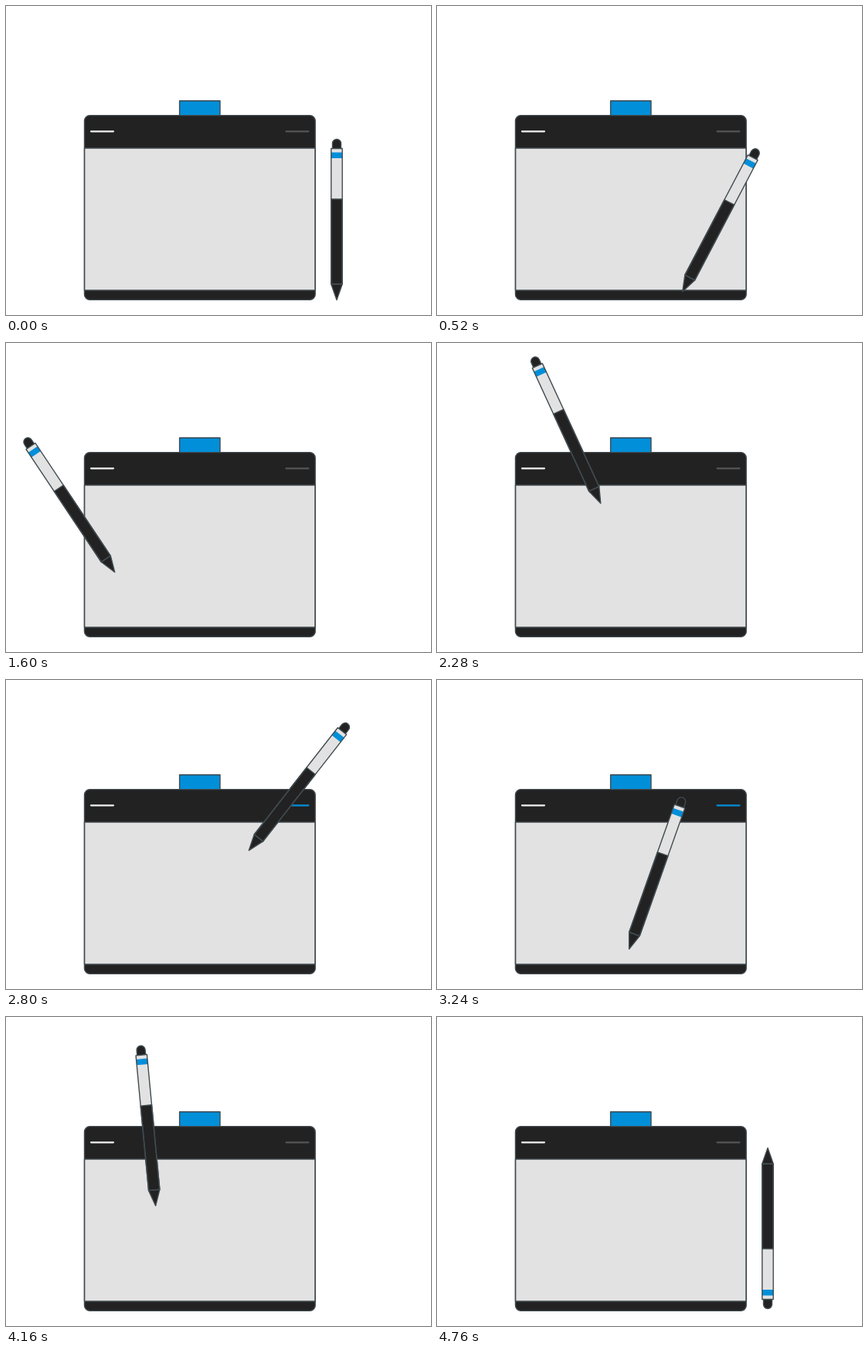
Write an HTML page that moves like this. It is 550 px wide and 400 px high and loops after 4800 ms.

```html
<!DOCTYPE html>
<html lang="en">
<head>
<meta charset="utf-8">
<title>Pen and tablet</title>
<style>
  html, body { margin: 0; width: 100%; height: 100%; overflow: hidden; background: #fff; }
  svg { display: block; width: 100%; height: 100%; }
  .edge { stroke: #414b50; stroke-width: 1.4; stroke-linejoin: round; }
  .dark { fill: #222; }
  .pale { fill: #e2e2e2; }
  .blue { fill: #028fd9; }
  .light { stroke-width: 2.2; stroke-linecap: round; }
</style>
</head>
<body>
<svg viewBox="0 0 550 400">
  <rect class="blue edge" x="224.6" y="122.7" width="52.4" height="22"/>
  <rect class="dark" x="101.5" y="141.6" width="298.7" height="238.8" rx="7"/>
  <rect class="pale edge" x="101.5" y="184" width="298.7" height="184"/>
  <rect class="edge" x="101.5" y="141.6" width="298.7" height="238.8" rx="7" fill="none"/>
  <path class="light" d="M110 162.3H139" stroke="#f2f2f2"/>
  <path class="light" id="lamp" d="M362.5 162.3H391.5" stroke="#555"/>
  <!-- The pen's tip is at its origin -->
  <g id="pen">
    <path class="dark edge" d="M-5.5 -196V-203a5.5 5.5 0 0 1 11 0V-196Z"/>
    <rect class="pale" x="-7.2" y="-196.5" width="14.4" height="66"/>
    <rect class="blue" x="-7.2" y="-191.5" width="14.4" height="7.5"/>
    <rect class="dark edge" x="-7.2" y="-131" width="14.4" height="110"/>
    <path class="dark edge" d="M-7.2 -21H7.2L0 -.5Z"/>
    <rect class="edge" x="-7.2" y="-196.5" width="14.4" height="175.5" fill="none"/>
  </g>
</svg>
<script>
  const LOOP = 4800, STEP = 40;
  const pen = document.getElementById("pen");
  const lamp = document.getElementById("lamp");

  const pose = (t, x, y, lean) => ({ t, x, y, lean });

  // Turning points of the pen: time, tip, lean in degrees
  const path = [
    pose(0, 428, 381, 0),
    pose(280, 361, 318, 28),
    pose(560, 311, 376, 27),
    pose(960, 256, 344, 16.8),
    pose(1600, 141, 297, -33.7),
    pose(1900, 192, 219, -4),
    pose(2160, 203, 212, -36),
    pose(2280, 212, 208, -24.7),
    pose(2800, 314, 221, 38),
    pose(3120, 188, 305, 14),
    pose(3360, 311, 376, 27),
    pose(3640, 240, 284, 28.9),
    pose(3920, 149, 271, -20),
    pose(4200, 205, 243, 0),
    pose(4480, 299, 258, 57),
    pose(4760, 428, 169, 180)
  ];

  const slope = (a, b, key) => (b[key] - a[key]) / (b.t - a.t);

  // Slope through a turning point, weighted to its nearer neighbour
  function tangent(i, key) {
    const a = path[i - 1], b = path[i], c = path[i + 1];
    if (!a || !c) return 0;
    const before = b.t - a.t, after = c.t - b.t;
    return (before * slope(b, c, key) + after * slope(a, b, key)) / (before + after);
  }

  function sample(t, key) {
    const i = path.findIndex(p => p.t >= t);
    if (i < 1) return path[0][key];
    const a = path[i - 1], b = path[i];
    const span = b.t - a.t, u = (t - a.t) / span, v = 1 - u;
    return a[key] * v * v * (1 + 2 * u) + b[key] * u * u * (3 - 2 * u) +
      span * u * v * (v * tangent(i - 1, key) - u * tangent(i, key));
  }

  const drawing = t => (t >= 560 && t < 1200) || (t >= 2640 && t < 4000);

  function draw(ms) {
    const t = Math.floor(ms % LOOP / STEP) * STEP;
    const x = sample(t, "x"), y = sample(t, "y"), lean = sample(t, "lean");
    pen.setAttribute("transform", `translate(${x} ${y}) rotate(${lean})`);
    lamp.setAttribute("stroke", drawing(t) ? "#028fd9" : "#555");
  }

  const start = performance.now();
  function tick() {
    draw(performance.now() - start);
    requestAnimationFrame(tick);
  }
  tick();
</script>
</body>
</html>
```
